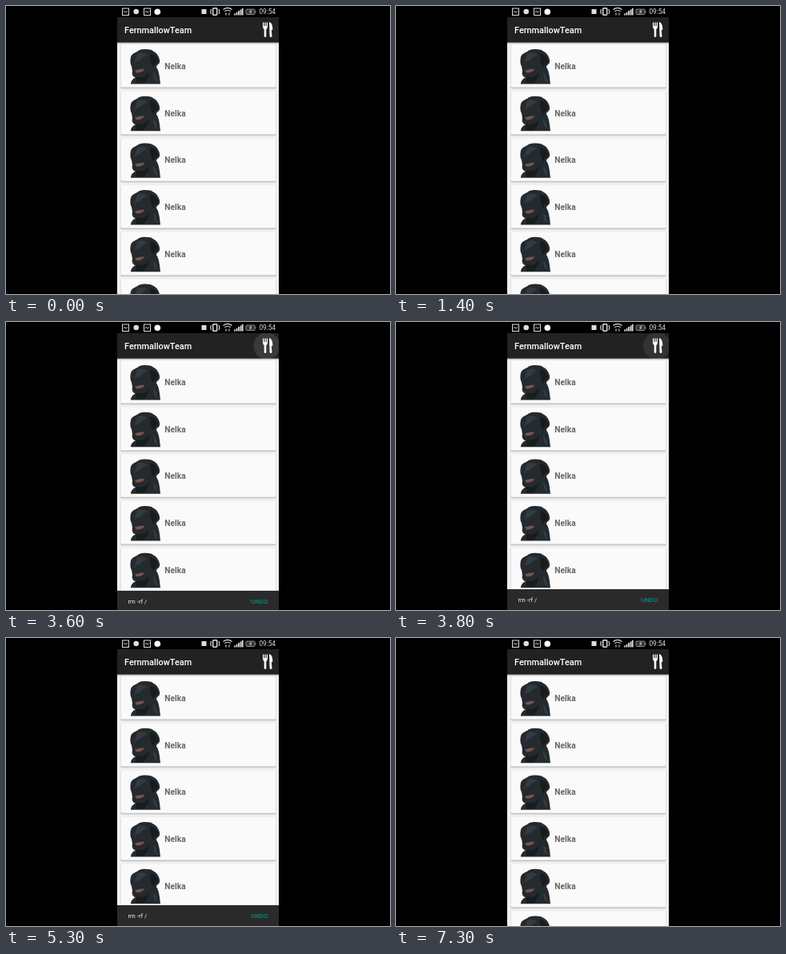
Recreate the animation shown at these times as an HTML page. Size 480x360 px, loop 8000 ms.

```html
<!DOCTYPE html>
<html lang="en">
<head>
<meta charset="utf-8">
<style>
html, body { margin: 0; width: 100%; height: 100%; overflow: hidden; background: #000; }
svg { display: block; width: 480px; height: 360px; font-family: Roboto, sans-serif; }
.line { fill: none; stroke: #ddd; }
</style>
</head>
<body>
<svg viewBox="0 0 480 360">
  <defs>
    <clipPath id="screen"><rect x="139" width="202" height="360"/></clipPath>
    <clipPath id="barClip"><rect x="139" y="14" width="202" height="31.7"/></clipPath>
    <linearGradient id="shade" x2="0" y2="1">
      <stop stop-color="#000" stop-opacity=".25"/><stop offset="1" stop-color="#000" stop-opacity="0"/>
    </linearGradient>
    <g id="dog">
      <path fill="#242a2e" d="M2 21C0 18 0 13 1 9C3 4 8 4 11 1C16-1 26-1 29 2C34 4 38 11 37 16C36 19 33 19 33 22C36 26 37 33 38 43H1C1 39 4 36 7 35C3 34 2 30 3 27Z"/>
      <path fill="#181c1f" d="M25 5C31 5 35 11 35 15Q31 18 29 22Q25 17 25 5ZM8 34Q18 37 24 28Q23 37 17 42H8Z"/>
      <path fill="#333b40" d="M9 5Q17 2 22 7Q17 8 13 13Q8 14 5 18ZM29 28Q34 33 34 41Q29 38 29 28Z"/>
      <path fill="#77534b" d="M6 26Q12 24 18 24Q17 29 8 29Z"/>
    </g>
    <g id="card">
      <rect x="143" y="48" width="195" height="56" rx="1.5" fill="#e2e2e2"/>
      <rect x="143.5" y="100" width="194" height="3" rx="1.5" fill="#c6c6c6"/>
      <rect x="144" y="48" width="193" height="53.5" rx="1" fill="#fafafa"/>
      <use href="#dog" x="155" y="54.5"/>
      <text x="198.3" y="79" font-size="10.2" font-weight="700" fill="#676767">Nelka</text>
    </g>
    <g id="monitor" class="line">
      <rect x="145.5" y="3" width="8" height="8.5"/>
      <path d="M147 8L148.5 6L150 8.5L152 6" stroke-width=".8"/>
    </g>
  </defs>
  <g clip-path="url(#screen)">
    <rect x="139" width="202" height="360" fill="#f0f0f0"/>
    <g id="list"></g>
    <rect x="139" y="45.7" width="202" height="2.3" fill="url(#shade)"/>
    <rect x="139" width="202" height="14" fill="#000"/>
    <rect x="139" y="14" width="202" height="31.7" fill="#222"/>
    <circle id="ripple" cx="326" cy="30" fill="#fff" clip-path="url(#barClip)"/>
    <text x="148" y="34" font-size="10.9" font-weight="500" fill="#fff">FernmallowTeam</text>

    <!-- fork and knife -->
    <path fill="none" stroke="#fff" d="M321.6 20.5V26M324 20.5V26M326.4 20.5V26" stroke-width="1.3"/>
    <path fill="#fff" d="M321 25H327Q327 28 325.3 29V38Q324 40 322.7 38V29Q321 28 321 25ZM329 20Q333.5 21 333.3 30H331.8L332.5 38Q331 40 329.6 38Z"/>

    <!-- status bar -->
    <use href="#monitor"/>
    <use href="#monitor" x="27"/>
    <circle cx="162.7" cy="7" r="3.3" fill="#ddd"/>
    <circle cx="189.3" cy="7.2" r="3.8" fill="#fff"/>
    <rect x="244.5" y="4" width="6" height="6" fill="#ddd"/>
    <g class="line">
      <rect x="258.7" y="2.8" width="5" height="8.5" rx=".7" stroke-width="1.5"/>
      <path d="M256.5 4Q254.8 7 256.5 10M266 4Q267.7 7 266 10" stroke-width="1.2"/>
      <path d="M271.5 4.5Q277 .2 282.5 4.5M273.3 6.7Q277 3.8 280.7 6.7" stroke-width="1.2"/>
      <path d="M275 11.5V8.5M278.8 8.5V11.5" stroke="#888" stroke-width="1.8"/>
      <path d="M286 11.5V9.5M288.5 11.5V8M291 11.5V6M293.5 11.5V4.5M295.7 11.5V2.7" stroke-width="1.8"/>
      <rect x="300" y="4" width="11" height="6.5" rx=".7" fill="#333" stroke="#888"/>
      <path d="M312 6V8.5" stroke="#888"/>
      <path d="M307 4.8L304.5 7H307L304.5 9.7" stroke-width=".9"/>
    </g>
    <text x="316.5" y="10.2" font-size="8.2" fill="#ddd">09:54</text>

    <g id="snack">
      <rect x="139" y="334" width="202" height="27" fill="#2a2a2a"/>
      <text x="152.5" y="350" font-size="7.7" fill="#f2f2f2">rm -rf /</text>
      <text x="306" y="350" font-size="7.9" font-weight="500" fill="#11897b">UNDO</text>
    </g>
  </g>
</svg>
<script>
const $ = id => document.getElementById(id);
const LOOP = 8000, PITCH = 58.67;
const part = (t, from, to) => Math.min(1, Math.max(0, (t - from) / (to - from)));
const easeOut = u => 1 - (1 - u) ** 3;
const easeInOut = u => u * u * (3 - 2 * u);

$('list').innerHTML = Array.from({ length: 6 },
  (_, i) => `<use href="#card" y="${i * PITCH}"/>`).join('');

function draw(now) {
  const t = now % LOOP;
  const shown = easeOut(part(t, 3430, 3720)) - easeInOut(part(t, 6600, 6850));
  $('snack').setAttribute('transform', `translate(0 ${27 * (1 - shown)})`);
  $('snack').style.visibility = shown > 0 ? 'visible' : 'hidden';
  $('ripple').setAttribute('r', 17 * easeOut(part(t, 3350, 3700)));
  $('ripple').style.opacity = 0.11 * part(t, 3350, 3450) * (1 - part(t, 3700, 4050));
  requestAnimationFrame(draw);
}
draw(performance.now());
</script>
</body>
</html>
```
